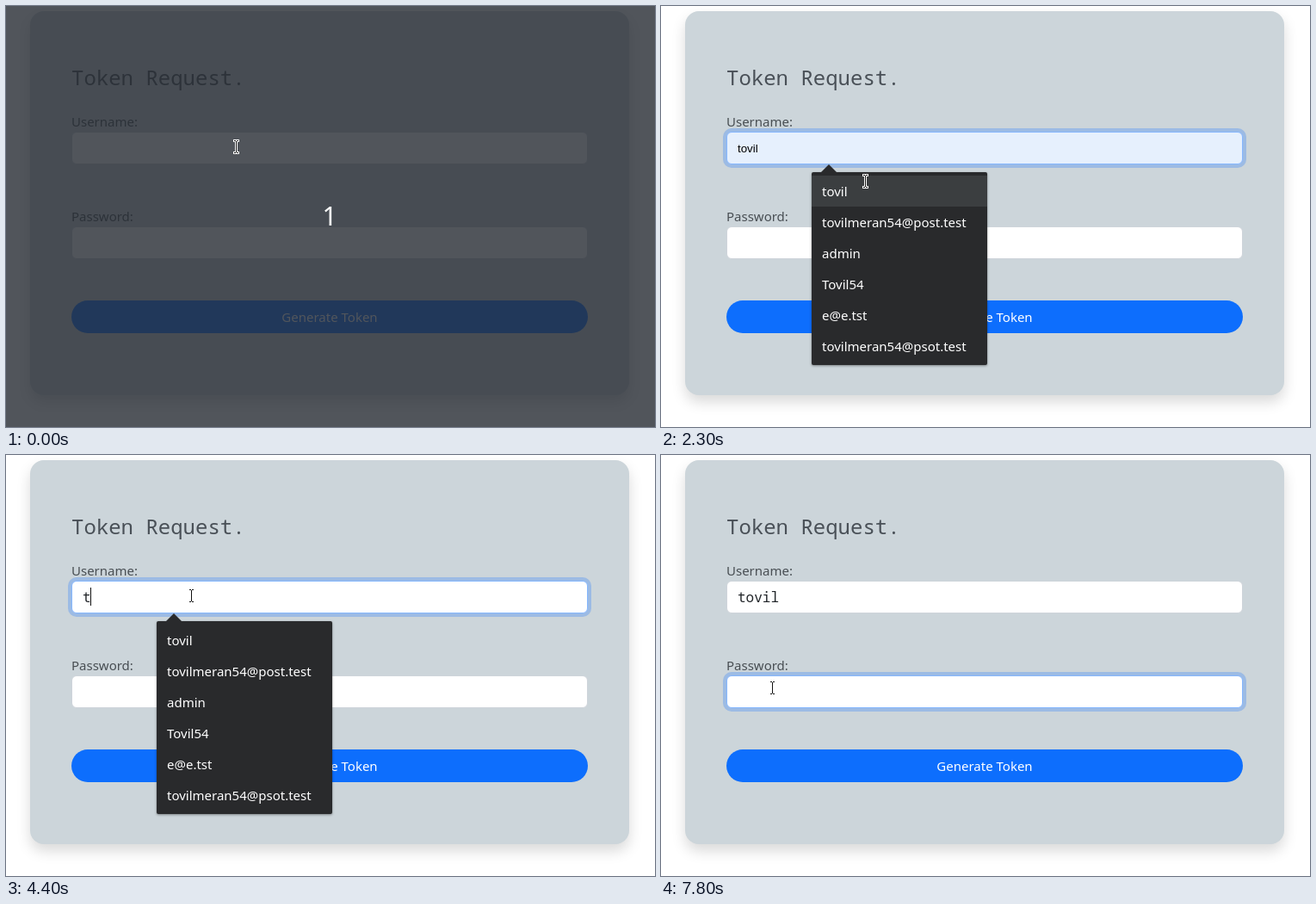
These frames come from a looping animation (754x489 px, 8000 ms). An HTML page:

```html
<!DOCTYPE html>
<html lang="en">
<head>
<meta charset="utf-8">
<title>Token Request</title>
<style>
html, body { margin: 0; width: 100%; height: 100%; overflow: hidden; background: #fff; }
body { position: relative; font: 15px/24px "Noto Sans", sans-serif; color: #484e53; cursor: default; }
body * { box-sizing: border-box; }
.abs, .field, .caret, .row { position: absolute; white-space: pre; }
.card { left: 28px; top: 6px; width: 696px; height: 446px; border-radius: 16px;
  background: #ccd5da; box-shadow: 0 8px 16px rgba(0,0,0,.15); }
.mono { font-family: "Noto Sans Mono", monospace; }
h1 { left: 76px; top: 68px; margin: 0; font-size: 24px; line-height: 30px; font-weight: 400; color: #495057; }
.field { left: 76px; width: 600px; height: 38px; padding-left: 12px; border: 1px solid #ced4da; border-radius: 6px;
  background: #fff; color: #212529; font-size: 16px; line-height: 36px; }
.field.preview { background: #e6f0fd; color: #000; font: 13.33px/38px "Liberation Sans", sans-serif; }
.caret { left: 89px; width: 1px; height: 21px; background: #111; }
.button { left: 76px; top: 342px; width: 600px; height: 38px; border-radius: 19px;
  background: #0d6efd; color: #fff; line-height: 38px; text-align: center; }
#menu { left: 175px; top: 193px; width: 204px; height: 224px; padding-top: 4px; border-radius: 2px;
  background: #292a2c; color: #fff; box-shadow: 0 1px 3px rgba(0,0,0,.4); }
#menu::before { content: ""; position: absolute; left: 11px; top: -9px;
  border: solid transparent; border-width: 0 9px 9px; border-bottom-color: #292a2c; }
.row { left: 0; width: 100%; height: 36px; padding-left: 12px; line-height: 36px; }
.row.hover { background: #3b3e40; }
#dim { inset: 0; background: rgba(38,43,51,.8); }
#count { left: 0; width: 752px; top: 223px; font-size: 30px; line-height: 42px; text-align: center; color: #fff; }
#pointer { left: -5px; top: -9px; }
</style>
</head>
<body>
<div class="abs card"></div>
<h1 class="abs mono">Token Request.</h1>
<div class="abs" style="left:76px;top:122px">Username:</div>
<div class="abs" style="left:76px;top:232px">Password:</div>
<div id="user" class="field mono" style="top:146px"></div>
<div id="pass" class="field mono" style="top:256px"></div>
<div id="userCaret" class="caret" style="top:154px"></div>
<div id="passCaret" class="caret" style="top:264px"></div>
<div class="abs button">Generate Token</div>
<div id="menu" class="abs"></div>
<div id="dim" class="abs"><div id="count" class="abs">1</div></div>
<svg id="pointer" class="abs" width="11" height="19" fill="none">
  <path d="M2 2.5H9M5.5 2.5V16.5M2 16.5H9" stroke="#fff" stroke-width="3"/>
  <path d="M3 2.5H5M6 2.5H8M5.5 3V16M3 16.5H5M6 16.5H8" stroke="#111"/>
</svg>
<script>
const LOOP = 8000, CHAR = 9.6;
const name = 'tovil', full = name + 'meran54', mail = full + '@post.test', typo = full + '@psot.test';
const lists = {
  all: [name, mail, 'admin', 'Tovil54', 'e@e.tst', typo],
  two: [name, mail, 'Tovil54', 'to@psot.test', 'tov@post.test', typo],
  three: [name, mail, 'Tovil54', 'tov@post.test', typo, name + ',.730916,.'],
  four: [name, mail, 'Tovil54', typo, name + ',.730916,.', full]
};

// Each step: start time and the values that change there.
const start = { dim: true, at: [267, 163], list: null, hover: false, typed: 0,
  userCaret: false, passCaret: false, userRing: 0, passRing: 0 };
const steps = [
  [100, { dim: false }],
  [500, { at: [265, 163] }],
  [700, { userRing: .5, list: 'all', userCaret: true }],
  [800, { userRing: 1 }],
  [1200, { userCaret: false }],
  [1500, { at: [261, 165] }],
  [1600, { at: [257, 169] }],
  [1800, { at: [242, 199], hover: true }],
  [1900, { at: [237, 203] }],
  [2400, { at: [200, 211], hover: true }],
  [2500, { at: [158, 214], hover: false, list: null, userRing: .5 }],
  [2600, { at: [155, 214], userRing: 0 }],
  [2800, { at: [166, 201] }],
  [2900, { at: [186, 180] }],
  [3000, { at: [204, 166] }],
  [3100, { at: [211, 161] }],
  [3200, { userRing: .15, list: 'all', userCaret: true }],
  [3400, { userRing: .7, at: [212, 161] }],
  [3500, { userRing: 1, at: [214, 162] }],
  [3600, { at: [215, 163] }],
  [3800, { userCaret: false }],
  [4400, { typed: 1, userCaret: true }],
  [4500, { list: 'two' }],
  [4600, { typed: 2 }],
  [5100, { typed: 3 }],
  [5200, { list: 'three' }],
  [5300, { typed: 4, list: 'four' }],
  [5700, { typed: 5 }],
  [6300, { userCaret: false }],
  [6700, { at: [213, 182] }],
  [6800, { at: [160, 234], userCaret: true }],
  [6900, { at: [125, 261] }],
  [7100, { at: [127, 266] }],
  [7200, { at: [129, 270] }],
  [7300, { list: null, userCaret: false, passCaret: true, userRing: .85, passRing: .15 }],
  [7400, { userRing: .3, passRing: .7 }],
  [7500, { userRing: 0, passRing: 1 }],
  [7800, { passCaret: false }]
];

const $ = id => document.getElementById(id);
const show = (id, on) => { $(id).style.visibility = on ? 'visible' : 'hidden'; };
const rows = lists.all.map((_, i) => {
  const row = document.createElement('div');
  row.className = 'row';
  row.style.top = 4 + 36 * i + 'px';
  $('menu').append(row);
  return row;
});

function setRing(id, amount) {
  const mix = (from, to) => from + (to - from) * amount;
  const style = $(id).style;
  style.borderColor = `rgb(${mix(206, 134)},${mix(212, 183)},${mix(218, 254)})`;
  style.boxShadow = `0 0 0 ${4 * amount}px rgba(13,110,253,${.25 * amount})`;
}

function draw(state) {
  show('dim', state.dim);
  show('menu', state.list);
  show('userCaret', state.userCaret && !state.hover);
  show('passCaret', state.passCaret);
  setRing('user', state.userRing);
  setRing('pass', state.passRing);
  $('user').textContent = state.hover ? name : name.slice(0, state.typed);
  $('user').classList.toggle('preview', state.hover);
  $('userCaret').style.left = Math.floor(89 + CHAR * state.typed) + 'px';
  if (state.list) rows.forEach((row, i) => { row.textContent = lists[state.list][i]; });
  rows[0].classList.toggle('hover', state.hover);
  $('pointer').style.transform = `translate(${state.at[0]}px,${state.at[1]}px)`;
}

let current = -1;
const origin = performance.now();
function tick() {
  const time = (performance.now() - origin) % LOOP;
  const past = steps.filter(([at]) => at <= time);
  if (past.length !== current) {
    current = past.length;
    draw(Object.assign({}, start, ...past.map(step => step[1])));
  }
  requestAnimationFrame(tick);
}
tick();
</script>
</body>
</html>
```
